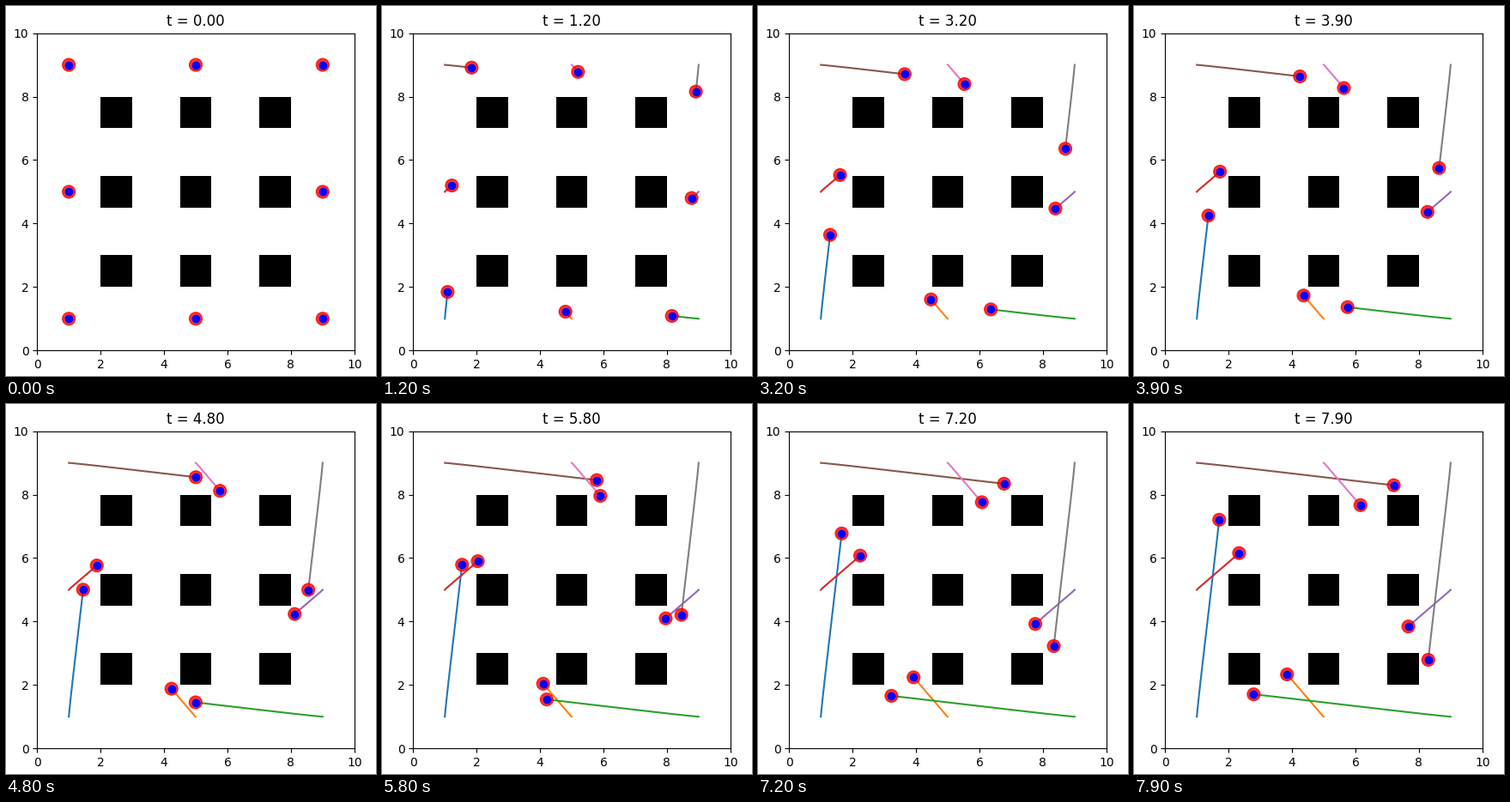
A matplotlib script for the animation above (8 s loop, 431x431 px).

```python
import numpy as np
import matplotlib.pyplot as plt
from matplotlib.animation import FuncAnimation
from matplotlib.patches import Circle, Rectangle

SIZE, DPI = 431, 100
FRAMES, DT = 80, 0.1

# Sampled displacements of one corner agent and one mid-side agent
KNOTS = [1.2, 2.5, 3.9, 5.8, 7.2, 7.9]
CORNER_X = [0.086, 0.220, 0.365, 0.544, 0.656, 0.707]
CORNER_Y = [0.839, 2.020, 3.252, 4.786, 5.778, 6.206]
MIDDLE_X = [0.220, 0.478, 0.733, 1.036, 1.239, 1.335]
MIDDLE_Y = [0.198, 0.416, 0.636, 0.901, 1.073, 1.159]

time = np.arange(FRAMES) * DT


def travel(values, degree):
    """Smooth displacement that starts from rest."""
    p = np.polyfit(KNOTS, values, degree)
    lag = -p[-1] / p[-2]
    return np.polyval(p, time) - p[-1] * np.exp(-time / lag)


def turn(path, quarters):
    """Rotate a path counter-clockwise about the middle of the field."""
    x, y = path
    for _ in range(quarters):
        x, y = 10 - y, x
    return x, y


corner = 1 + travel(CORNER_X, 3), 1 + travel(CORNER_Y, 3)
middle = 1 + travel(MIDDLE_X, 2), 5 + travel(MIDDLE_Y, 2)
paths = [
    turn(corner, 0), turn(middle, 1), turn(corner, 1),
    turn(middle, 0), turn(middle, 2),
    turn(corner, 3), turn(middle, 3), turn(corner, 2),
]

side = (SIZE + 0.001) / DPI  # keeps the pixel size from rounding down
fig = plt.figure(figsize=(side, side), dpi=DPI)
ax = fig.add_axes([36.2 / SIZE, 29.8 / SIZE, 369.6 / SIZE, 369.6 / SIZE])
ax.set(xlim=(0, 10), ylim=(0, 10))
title = ax.set_title("t = 0.00")

for x in (2, 4.5, 7):
    for y in (2, 4.5, 7):
        ax.add_patch(Rectangle((x, y), 1, 1, fc="black", ec="none"))

trails = [ax.plot([], [], color=f"C{i}")[0] for i in range(len(paths))]
bodies = [ax.add_patch(Circle((0, 0), 0.2, color="red", alpha=0.8, zorder=3))
          for _ in paths]
dots, = ax.plot([], [], "bo", zorder=4)


def draw(n):
    title.set_text(f"t = {time[n]:.2f}")
    for (x, y), trail, body in zip(paths, trails, bodies):
        trail.set_data(x[:n + 1], y[:n + 1])
        body.center = x[n], y[n]
    dots.set_data([x[n] for x, _ in paths], [y[n] for _, y in paths])
    return [title, dots, *trails, *bodies]


anim = FuncAnimation(fig, draw, frames=FRAMES, interval=100,
                     repeat=True, repeat_delay=0, blit=False)
plt.show()
```
